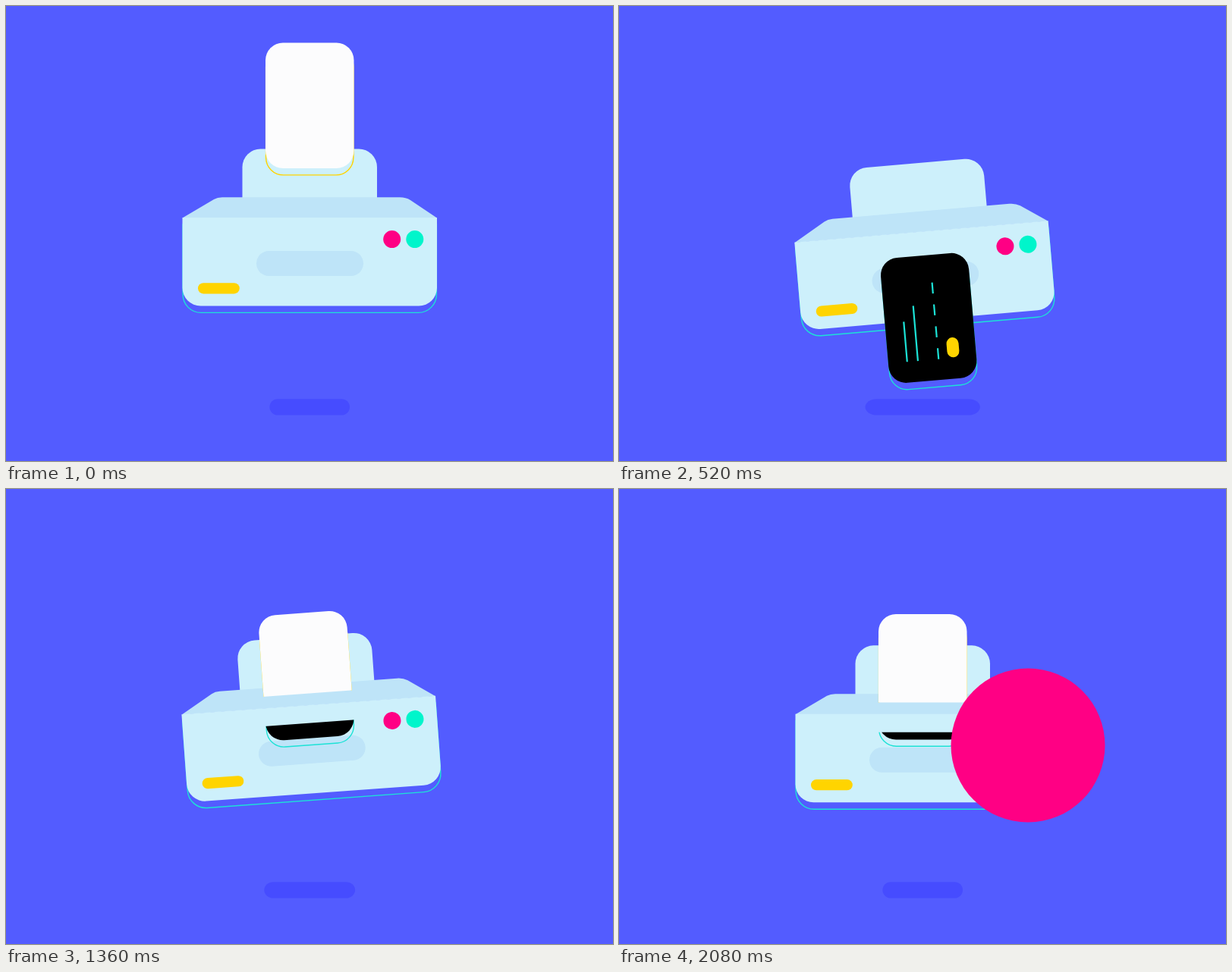
An HTML page with a canvas for the animation above (2.12 s loop, 800 by 600 pixels).

```html
<!DOCTYPE html>
<html lang="en">
<head>
<meta charset="utf-8">
<title>Printer</title>
<style>
  html, body { margin: 0; width: 100%; height: 100%; overflow: hidden; background: #535cff; }
  canvas { display: block; }
</style>
</head>
<body>
<canvas id="stage" width="800" height="600"></canvas>
<script>
const ctx = document.getElementById('stage').getContext('2d');
const LOOP = 2120, STEP = 40, PRINT = 1165;
const BG = '#535cff', SHADOW = '#464cff', LIGHT = '#cdf0fb', SHADE = '#bee4f8';
const YELLOW = '#ffd400', PINK = '#ff0084', GREEN = '#00f5cb', LINE = '#1ce2d6';
const DROP = 9.5;

const clamp = x => Math.min(1, Math.max(0, x));
const ease = (t, start, length) => {
  const x = clamp((t - start) / length);
  return x * x * (3 - 2 * x);
};

// Linear interpolation through [time, value] keys
function track(t, keys) {
  if (t <= keys[0][0]) return keys[0][1];
  for (let i = 1; i < keys.length; i++) {
    const [a, u] = keys[i - 1], [b, v] = keys[i];
    if (t <= b) return u + (v - u) * (t - a) / (b - a);
  }
  return keys[keys.length - 1][1];
}

function box(x, y, w, h, r, color) {
  ctx.beginPath();
  ctx.roundRect(x, y, w, h, r);
  ctx.fillStyle = color;
  ctx.fill();
}

function outline(x, y, w, h, r, color) {
  ctx.beginPath();
  ctx.roundRect(x + 0.6, y + DROP - 0.6, w - 1.2, h, r);
  ctx.strokeStyle = color;
  ctx.lineWidth = 1.4;
  ctx.stroke();
}

function dot(x, y, r, color) {
  ctx.beginPath();
  ctx.arc(x, y, r, 0, Math.PI * 2);
  ctx.fillStyle = color;
  ctx.fill();
}

function bar(x, top, bottom) {
  ctx.beginPath();
  ctx.moveTo(x, top);
  ctx.lineTo(x, bottom);
  ctx.stroke();
}

function clipped(top, bottom, draw) {
  ctx.save();
  ctx.beginPath();
  ctx.rect(0, top, 800, bottom - top);
  ctx.clip();
  draw();
  ctx.restore();
}

function body() {
  outline(232.5, 279, 335.5, 116.5, [0, 0, 24, 24], LINE);
  box(311.5, 188.5, 177.5, 68, [24, 24, 0, 0], LIGHT);

  ctx.beginPath();
  ctx.moveTo(232.5, 279.5);
  ctx.lineTo(274, 255);
  ctx.quadraticCurveTo(278.5, 252.3, 285, 252.3);
  ctx.lineTo(519, 252.3);
  ctx.quadraticCurveTo(527, 252.3, 533, 256);
  ctx.lineTo(568, 279.5);
  ctx.fillStyle = SHADE;
  ctx.fill();

  box(232.5, 279, 335.5, 116.5, [0, 0, 24, 24], LIGHT);
  box(330, 323, 141, 33, 16.5, SHADE);
  box(253, 365.2, 54.8, 14.2, 7.1, YELLOW);
  dot(508.7, 307.6, 11.5, PINK);
  dot(538.8, 307.6, 11.5, GREEN);
}

function sheet(y, fill, line) {
  outline(342, y, 116.5, 165.5, 23, line);
  box(342, y, 116.5, 165.5, 23, fill);
}

function card(y) {
  sheet(y, '#000', LINE);
  ctx.strokeStyle = LINE;
  ctx.lineWidth = 2.2;
  bar(367, y + 85, y + 138);
  bar(381.2, y + 65, y + 138);
  for (let i = 0; i < 4; i++) bar(408.6, y + 36.5 + i * 29, y + 51 + i * 29);
  box(420.6, y + 111, 16, 26.2, 8, YELLOW);
}

function shadow(t) {
  const scale = track(t, [[0, 1], [600, 1.5], [1200, 1], [1720, 1.437], [2080, 1]]);
  ctx.save();
  ctx.translate(400.2, 0);
  ctx.scale(scale, 1);
  box(-52.8, 518.2, 105.6, 21.3, 10.65, SHADOW);
  ctx.restore();
}

function printer(t) {
  const tilt = track(t, [[30, 0], [437, -10.3], [672, 5], [915, 0]]);
  const sink = 18.5 * (ease(t, 65, 345) - ease(t, 885, 268));
  const feed = 262 * (ease(t, 62, 300) - ease(t, 740, 300));
  const y = 48.5 + feed;

  ctx.save();
  ctx.translate(400, 300 + sink);
  ctx.rotate(tilt * Math.PI / 180);
  ctx.translate(-400, -300);
  body();
  clipped(0, 263.7, () => sheet(y, '#fcfcfd', YELLOW));
  clipped(302.8, 600, () => card(y));
  ctx.restore();
}

function render(t) {
  ctx.fillStyle = BG;
  ctx.fillRect(0, 0, 800, 600);
  shadow(t);
  printer(t % PRINT);
  const grow = clamp((t - 1960) / 120);
  if (grow > 0) dot(539, 338, 101.5 * grow * grow, PINK);
}

const begin = performance.now();
function tick() {
  const t = Math.max(0, performance.now() - begin) % LOOP;
  render(Math.floor(t / STEP) * STEP);
  requestAnimationFrame(tick);
}
tick();
</script>
</body>
</html>
```
